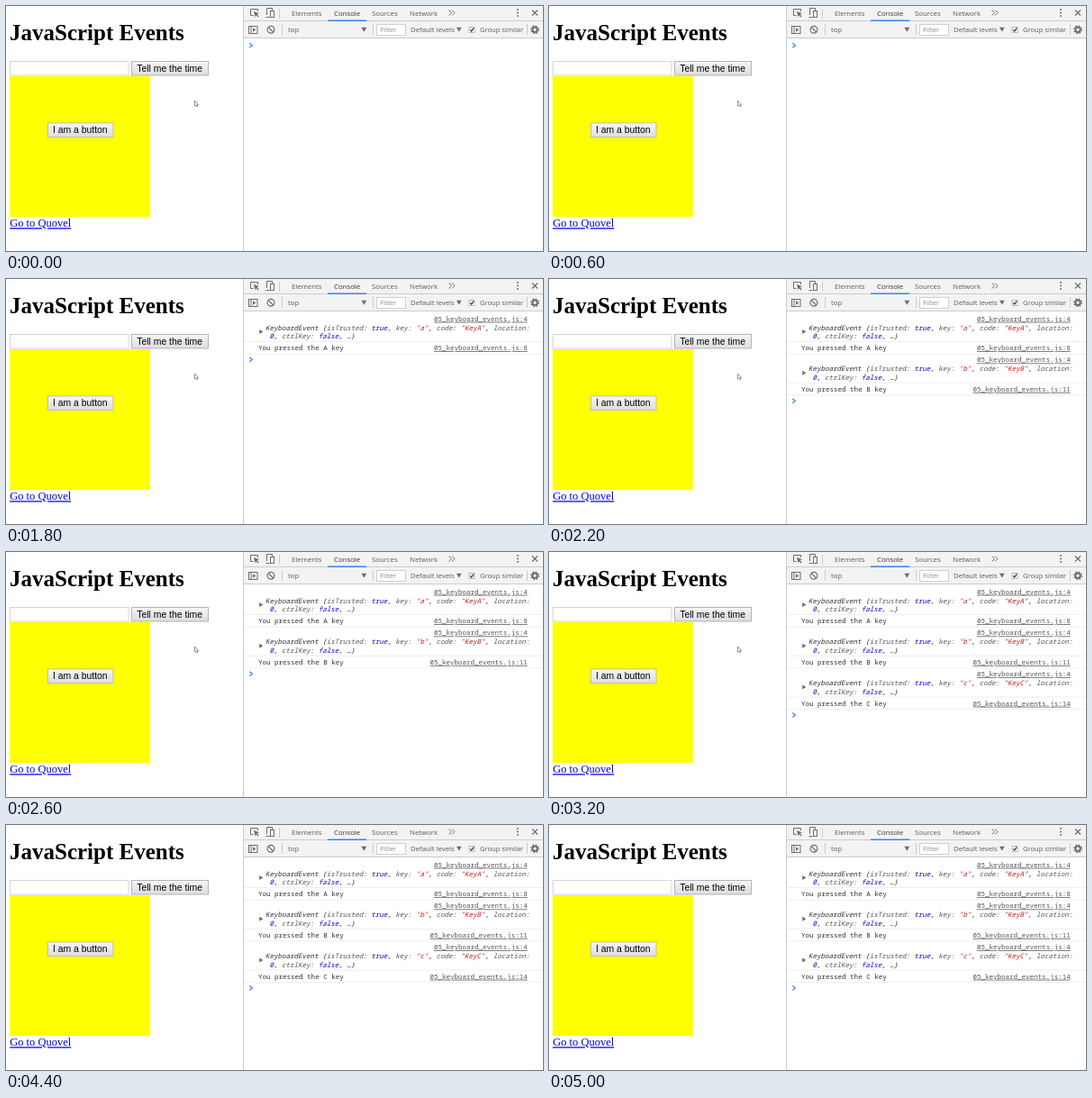
Animation, 596 px wide and 272 px high, one loop 5100 ms. Source, as an HTML page:

```html
<!DOCTYPE html>
<html lang="en">
<head>
<meta charset="utf-8">
<title>JavaScript Events</title>
<style>
  html, body { margin: 0; width: 100%; height: 100%; overflow: hidden; background: #fff; }
  svg { display: block; }
  text { white-space: pre; }
  .serif { font-family: "Liberation Serif", serif; }
  .button { font: 10.4px "Liberation Sans", sans-serif; }
  .ui { font: 7.8px "Open Sans", sans-serif; fill: #5a5a5a; }
  .mono { font: 7.53px "Noto Sans Mono", monospace; fill: #303030; }
  .mono .preview { font-style: italic; }
  .mono .link { text-decoration: underline; fill: #545454; text-anchor: end; }
  .key { fill: #565656; }
  .value { fill: #1c00cf; }
  .string { fill: #c41a16; }
  .icon { fill: none; stroke: #6e6e6e; }
  .solid { fill: #6e6e6e; }
  .rule { stroke: #ccc; }
</style>
</head>
<body>
<svg width="596" height="272" viewBox="0 0 596 272">
  <defs>
    <linearGradient id="face" x2="0" y2="1">
      <stop stop-color="#f6f6f6"/><stop offset="1" stop-color="#dddddd"/>
    </linearGradient>
  </defs>

  <!-- Web page -->
  <text class="serif" x="4" y="38.3" font-size="25" font-weight="bold">JavaScript Events</text>
  <rect x="4.5" y="61.5" width="131.5" height="15.5" fill="#fff" stroke="#d4d4d4"/>
  <rect x="4" y="78" width="156" height="156" fill="#ff0"/>
  <g class="button">
    <rect x="139.5" y="61.5" width="85" height="15.5" fill="url(#face)" stroke="#b4b4b4"/>
    <text x="145.3" y="72.8">Tell me the time</text>
    <rect x="46.5" y="129.9" width="72.5" height="15.8" fill="url(#face)" stroke="#c0c0a8"/>
    <text x="52" y="141.3">I am a button</text>
  </g>
  <text class="serif" x="4.2" y="245.3" font-size="12.5" fill="#00e" text-decoration="underline">Go to Quovel</text>
  <path id="cursor" d="M209.5 105v6l1.4-1 .9 1.8 1-.5-.8-1.7h1.6z" fill="#fff" stroke="#666" stroke-width=".7"/>

  <!-- Developer tools -->
  <rect x="264" width="332" height="35" fill="#f3f3f3"/>
  <path class="rule" d="M263.5 0V272M264 16.5H596M264 35.5H596M303.5 3v11M306.5 20v12M407.5 20v12M578.5 20v12"/>
  <path d="M357 16.3h43" stroke="#3b82f0" stroke-width="1.4"/>
  <g class="ui">
    <text x="317" y="10.7">Elements</text>
    <text x="364" y="10.7" fill="#333">Console</text>
    <text x="406" y="10.7">Sources</text>
    <text x="448" y="10.7">Network</text>
    <text x="313" y="29.2">top</text>
    <rect x="411.5" y="20.5" width="32" height="12" fill="#fff" stroke="#d0d0d0"/>
    <text x="415" y="29.2" style="fill:#8a8a8a">Filter</text>
    <text x="449" y="29.2">Default levels</text>
    <text x="526" y="29.2" font-size="7.6" style="font-size:7.6px">Group similar</text>
  </g>
  <g class="icon">
    <path d="M279.5 6V3.5h-8v7h3M289.5 10V2.5h6V5M288.5 12.5h4"/>
    <rect x="293.5" y="5.5" width="4" height="7"/>
    <path d="M491.5 4.5l3 3-3 3M495 4.5l3 3-3 3"/>
    <path d="M584 4.5l6 6M590 4.5l-6 6" stroke-width="1.2"/>
    <rect x="269.5" y="22.5" width="9.5" height="8"/>
    <path d="M272 22.5v8"/>
    <circle cx="294" cy="26.3" r="3.9" stroke-width="1.2"/>
    <path d="M291.3 23.6l5.4 5.4" stroke-width="1.2"/>
    <circle cx="587" cy="26.3" r="2.7" stroke-width="2"/>
    <circle cx="587" cy="26.3" r="4.2" stroke-width="1.4" stroke-dasharray="1.65"/>
    <rect x="514" y="23.5" width="6" height="6" fill="#fff" stroke="#aaa" stroke-width=".8"/>
    <path d="M515.2 26.3l1.5 1.7 2.5-3.7" stroke="#333" stroke-width="1.2"/>
  </g>
  <g class="solid">
    <path d="M275 6l6 2.3-2.4 1 2 2.2-1 1-2.1-2.2-1 2.2z"/>
    <circle cx="568" cy="4" r="1"/><circle cx="568" cy="7.5" r="1"/><circle cx="568" cy="11" r="1"/>
    <path d="M274 24.3v4.4l3.3-2.2zM394.3 23.8h6l-3 5zM500 23.8h5.6l-2.8 5z"/>
  </g>
  <g id="log" class="mono"></g>
  <path id="prompt" d="M270.3 41.2l3 2.5-3 2.5" fill="none" stroke="#4583ee" stroke-width="1.3"/>
</svg>
<script>
const LOOP = 5100, ENTRY_HEIGHT = 45.75, CURSOR_HIDDEN = 3800;
const entries = [
  { letter: 'a', line: 8, at: 1500 },
  { letter: 'b', line: 11, at: 2100 },
  { letter: 'c', line: 14, at: 2800 },
];
const byId = id => document.getElementById(id);
const span = (kind, content) => `<tspan class="${kind}">${content}</tspan>`;
const pair = (key, kind, value) => span('key', key + ': ') + span(kind, value);
const link = (y, line) => `<text class="link" x="578.7" y="${y}">05_keyboard_events.js:${line}</text>`;

function entryMarkup({ letter, line }, index) {
  const upper = letter.toUpperCase();
  const fields = [
    pair('isTrusted', 'value', 'true'),
    pair('key', 'string', `"${letter}"`),
    pair('code', 'string', `"Key${upper}"`),
  ].join(', ');
  return `<g transform="translate(0 ${index * ENTRY_HEIGHT})">
    ${link(46.7, 4)}
    <path class="solid" d="M281.2 56v5l4.2-2.5z"/>
    <text class="preview" x="288" y="56.6">KeyboardEvent {${fields}, ${span('key', 'location:')}</text>
    <text class="preview" x="292.5" y="66">${span('value', '0')}, ${pair('ctrlKey', 'value', 'false')}, …}</text>
    <text x="280" y="79.2">You pressed the ${upper} key</text>
    ${link(79.2, line)}
    <path d="M264 69.5H596M264 83.2H596" stroke="#eee"/>
  </g>`;
}

byId('log').innerHTML = entries.map(entryMarkup).join('');
const rows = [...byId('log').children];

function draw() {
  const time = performance.now() % LOOP;
  const count = entries.filter(entry => time >= entry.at).length;
  rows.forEach((row, i) => row.setAttribute('visibility', i < count ? 'visible' : 'hidden'));
  byId('prompt').setAttribute('transform', `translate(0 ${count * ENTRY_HEIGHT})`);
  byId('cursor').setAttribute('visibility', time < CURSOR_HIDDEN ? 'visible' : 'hidden');
  requestAnimationFrame(draw);
}
draw();
</script>
</body>
</html>
```
